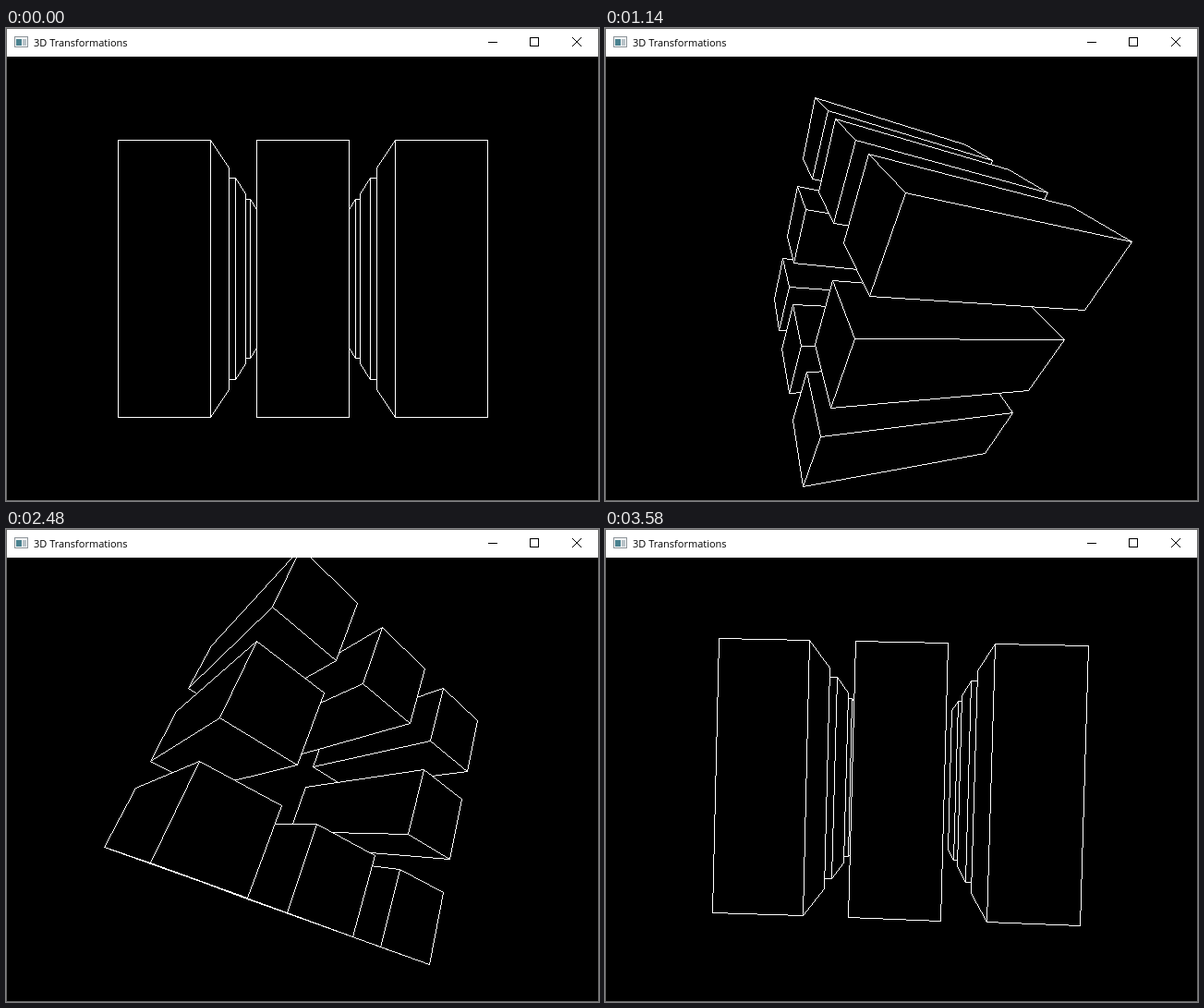
An HTML page with a canvas that plays this animation: 642x512 px, repeating every 3600 ms.

```html
<!DOCTYPE html>
<html lang="en">
<head>
<meta charset="utf-8">
<title>3D Transformations</title>
<style>
  html, body { margin: 0; width: 642px; height: 512px; overflow: hidden; background: #666; }
  body { position: relative; }
  header { position: absolute; left: 1px; top: 1px; width: 640px; height: 30px; background: #fff; }
  h1 { position: absolute; left: 29px; top: 7px; margin: 0; font: 400 11px/15px "Open Sans", "Noto Sans", sans-serif; color: #000; white-space: nowrap; }
  svg { position: absolute; left: -1px; top: -1px; }
  canvas { position: absolute; left: 1px; top: 31px; display: block; background: #000; }
</style>
</head>
<body>
<header>
  <svg width="642" height="31" fill="none" stroke="#000">
    <g stroke="none">
      <path fill="#8d9499" d="M9 9h15v12H9z"/>
      <path fill="#f4f6f7" d="M10 10h13v10H10z"/>
      <path fill="#4b8290" d="M11 12h6v7h-6z"/>
      <path fill="#b9c3c8" d="M18 12h4v7h-4z"/>
    </g>
    <path d="M522 15.5h10M567.5 10.5h9v9h-9z" shape-rendering="crispEdges"/>
    <path d="M613 10l10 10M623 10l-10 10"/>
  </svg>
  <h1>3D Transformations</h1>
</header>
<canvas id="view" width="640" height="480"></canvas>
<script>
const W = 640, H = 480, FOCUS = 400;
const BLACK = 0xff000000, WHITE = 0xffffffff;
const STEP_MS = 20, STEPS = 180;
const AXIS = [-1, -3, -4].map(v => v / Math.sqrt(26));
const PIVOT = [-50, -150, FOCUS];

const ctx = document.getElementById('view').getContext('2d');
const image = ctx.createImageData(W, H);
const pixels = new Uint32Array(image.data.buffer);

// Eight upright bars on a 3 x 3 plan with an empty centre.
const bars = [];
for (let i = 0; i < 3; i++) {
  for (let k = 0; k < 3; k++) {
    if (i === 1 && k === 1) continue;
    const lo = [150 * i - 150, 0, 150 * k];
    bars.push({ lo, hi: [lo[0] + 100, 300, lo[2] + 100] });
  }
}

function rotate(v, angle) {
  const c = Math.cos(angle), s = Math.sin(angle), [p, q, r] = AXIS;
  const along = (p * v[0] + q * v[1] + r * v[2]) * (1 - c);
  const cross = [q * v[2] - r * v[1], r * v[0] - p * v[2], p * v[1] - q * v[0]];
  return v.map((e, i) => e * c + cross[i] * s + AXIS[i] * along);
}

function project(point, angle) {
  const [x, y, z] = rotate(point, angle).map((e, i) => e + PIVOT[i]);
  return [Math.round(W / 2 + x * FOCUS / z), Math.round(H / 2 + y * FOCUS / z)];
}

function line([x0, y0], [x1, y1]) {
  const n = Math.max(Math.abs(x1 - x0), Math.abs(y1 - y0)) || 1;
  for (let i = 0; i <= n; i++) {
    const x = Math.round(x0 + (x1 - x0) * i / n);
    const y = Math.round(y0 + (y1 - y0) * i / n);
    if (x >= 0 && x < W && y >= 0 && y < H) pixels[y * W + x] = WHITE;
  }
}

const eachEdge = (face, fn) => face.forEach((a, i) => fn(a, face[(i + 1) % 4]));

function fill(face) {
  const ys = face.map(p => p[1]);
  const top = Math.max(0, Math.min(...ys)), bottom = Math.min(H - 1, Math.max(...ys));
  for (let y = top; y <= bottom; y++) {
    let left = W, right = -1;
    eachEdge(face, (a, b) => {
      if (a[1] === b[1] || (y - a[1]) * (y - b[1]) > 0) return;
      const x = a[0] + (b[0] - a[0]) * (y - a[1]) / (b[1] - a[1]);
      left = Math.min(left, x);
      right = Math.max(right, x);
    });
    const from = Math.max(0, Math.ceil(left)), to = Math.min(W - 1, Math.floor(right));
    if (to >= from) pixels.fill(BLACK, y * W + from, y * W + to + 1);
  }
}

function visibleFaces({ lo, hi }, eye, angle) {
  const faces = [];
  for (let a = 0; a < 3; a++) {
    const side = eye[a] < lo[a] ? lo[a] : eye[a] > hi[a] ? hi[a] : null;
    if (side === null) continue;
    const u = (a + 1) % 3, v = (a + 2) % 3;
    faces.push([[lo, lo], [hi, lo], [hi, hi], [lo, hi]].map(([m, n]) => {
      const point = [];
      point[a] = side;
      point[u] = m[u];
      point[v] = n[v];
      return project(point, angle);
    }));
  }
  return faces;
}

function draw(angle) {
  pixels.fill(BLACK);
  const eye = rotate(PIVOT.map(e => -e), -angle);
  const gap = (bar, a) => Math.abs((bar.lo[a] + bar.hi[a]) / 2 - eye[a]);
  // Far to near, one grid axis at a time.
  bars.sort((a, b) => gap(b, 0) - gap(a, 0) || gap(b, 2) - gap(a, 2));
  for (const bar of bars) {
    const faces = visibleFaces(bar, eye, angle);
    faces.forEach(fill);
    faces.forEach(face => eachEdge(face, line));
  }
  ctx.putImageData(image, 0, 0);
}

const start = performance.now();
let shown = -1;
function tick() {
  const step = Math.floor((performance.now() - start) / STEP_MS) % STEPS;
  if (step !== shown) draw(step * 2 * Math.PI / STEPS);
  shown = step;
  requestAnimationFrame(tick);
}
tick();
</script>
</body>
</html>
```
